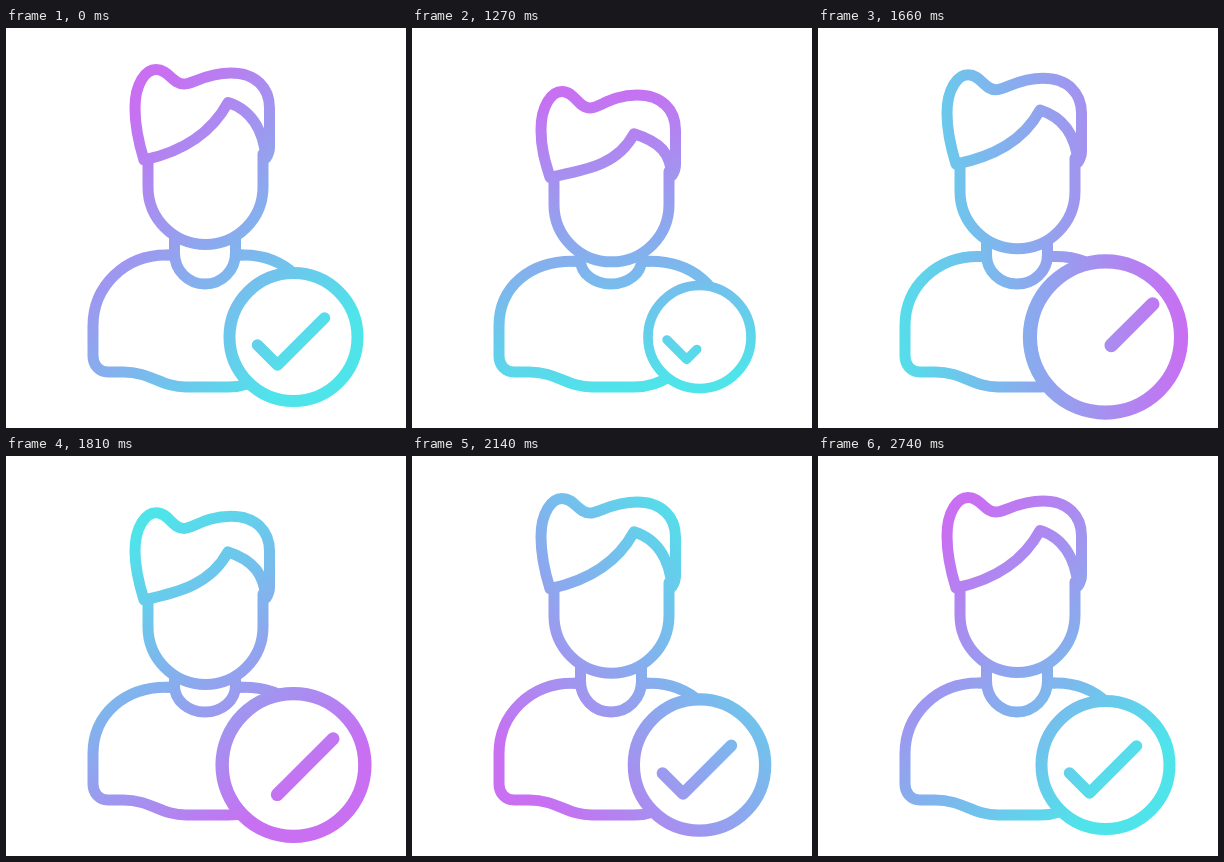
Animation, 400 px wide and 400 px high, one loop 2.77 s. Source, as an HTML page with a canvas:

```html
<!DOCTYPE html>
<html lang="en">
<head>
<meta charset="utf-8">
<title>Verified user</title>
<style>
  html, body { margin: 0; width: 100%; height: 100%; overflow: hidden; background: #fff; }
  canvas { display: block; width: 400px; height: 400px; }
</style>
</head>
<body>
<canvas id="stage" width="400" height="400"></canvas>
<script>
const ctx = document.getElementById('stage').getContext('2d');
const LOOP = 2770;
const linear = p => p;
const smooth = p => (1 - Math.cos(Math.PI * p)) / 2;

// Value at time t of a flat key list: time, value, time, value, ...
function at(t, keys, ease = linear) {
  if (t <= keys[0]) return keys[1];
  for (let i = 2; i < keys.length; i += 2) {
    if (t < keys[i]) {
      const p = (t - keys[i - 2]) / (keys[i] - keys[i - 2]);
      return keys[i - 1] + (keys[i + 1] - keys[i - 1]) * ease(p);
    }
  }
  return keys[keys.length - 1];
}

const nod = t => at(t, [1000, 0, 1275, 17.4, 1550, 0, 1825, 12, 2100, 0.3, 2390, 9.5, 2700, 0], smooth);
const badgeScale = t => at(t, [1000, 1, 1300, 0.8, 1720, 1.2, 1955, 0.94, 2170, 1.03, 2380, 1], smooth);
const gradientAngle = t => at(t, [1000, 225, 1270, 262, 1660, 357, 1930, 458, 2380, 550, 2740, 585]);

// Visible span of the tick, measured from its corner
function tickSpan(t) {
  return t < 1440
    ? [at(t, [1000, -20, 1270, -24.5]), at(t, [1000, 47, 1100, 39, 1270, 13, 1420, -24.5])]
    : [at(t, [1440, 56, 1660, 21, 1930, -14, 2110, -20]), at(t, [1660, 56, 1930, 48, 2110, 47])];
}

function gradient(t) {
  const a = gradientAngle(t) * Math.PI / 180;
  const x = 150 * Math.cos(a), y = 150 * Math.sin(a);
  const g = ctx.createLinearGradient(212 + x, 208 + y, 212 - x, 208 - y);
  g.addColorStop(0, '#c86ff2');
  g.addColorStop(1, '#4fe3ea');
  return g;
}

function draw(path, fill) {
  const shape = new Path2D(path);
  if (fill) ctx.fill(shape);
  ctx.stroke(shape);
}

function drawBody(d) {
  const top = 227 + 0.36 * d;
  draw(`M162 ${top} H160 C119 ${top} 87 258 87 298 V328
    C87 337 93 344 102 344 H117 C145 344 155 359 180 359 H222 C235 359 248 355 258 348
    M236 ${top} H238 C279 ${top} 311 258 311 298`);
  draw(`M162 ${top} H168 M236 ${top} H230`);
  const rim = 225 + 0.4 * d, low = rim + (256 - rim) * 0.56;
  draw(`M168.5 ${202 + d} V${rim} C168.5 ${low} 182 256 199 256 S229.5 ${low} 229.5 ${rim} V${202 + d}`);
}

function drawHead(d) {
  const base = y => y + d, crown = y => y + 1.27 * d;
  const dip = y => y + 1.38 * d, fringe = y => y + 1.8 * d;
  draw(`M142 ${base(130)} V${base(159)} A57.5 57.5 0 0 0 257 ${base(159)} V${base(126)}`, true);
  draw(`M138 ${base(132)} C133 ${base(116)} 129 ${crown(98)} 129 ${crown(80)}
    C129 ${crown(55)} 140 ${crown(41.5)} 150 ${crown(41.5)}
    C163 ${crown(41.5)} 166 ${dip(56)} 178 ${dip(56)}
    C187 ${dip(56)} 200 ${crown(45)} 225 ${crown(45)}
    C250 ${crown(45)} 263.5 ${crown(60)} 263.5 ${crown(80)}
    V${base(119)} C263.5 ${base(124)} 262 ${base(127)} 260 ${base(130)}
    C258 ${base(108)} 249 ${fringe(83)} 222 ${fringe(74.5)}
    C205 ${fringe(106)} 175 ${base(124)} 138 ${base(132)} Z`, true);
}

function drawBadge(t) {
  const s = badgeScale(t), cx = 287.5, cy = 309;
  ctx.lineWidth = 12 * s;
  ctx.beginPath();
  ctx.arc(cx, cy, 64 * s, 0, 2 * Math.PI);
  ctx.fill();
  ctx.stroke();

  const [from, to] = tickSpan(t);
  if (to - from < 0.5) return;
  const stops = from < 0 && to > 0 ? [from, 0, to] : [from, to];
  ctx.lineWidth = 11.5 * s;
  ctx.beginPath();
  for (const u of stops) {
    ctx.lineTo(cx + (u - 16) * s, cy + (28 - Math.abs(u)) * s);
  }
  ctx.stroke();
}

function frame(now) {
  const t = now % LOOP;
  ctx.fillStyle = '#fff';
  ctx.fillRect(0, 0, 400, 400);
  ctx.lineCap = ctx.lineJoin = 'round';
  ctx.strokeStyle = gradient(t);
  ctx.lineWidth = 11;
  const d = nod(t);
  drawBody(d);
  drawHead(d);
  drawBadge(t);
}

const start = performance.now();
function tick() {
  frame(performance.now() - start);
  requestAnimationFrame(tick);
}
tick();
</script>
</body>
</html>
```
